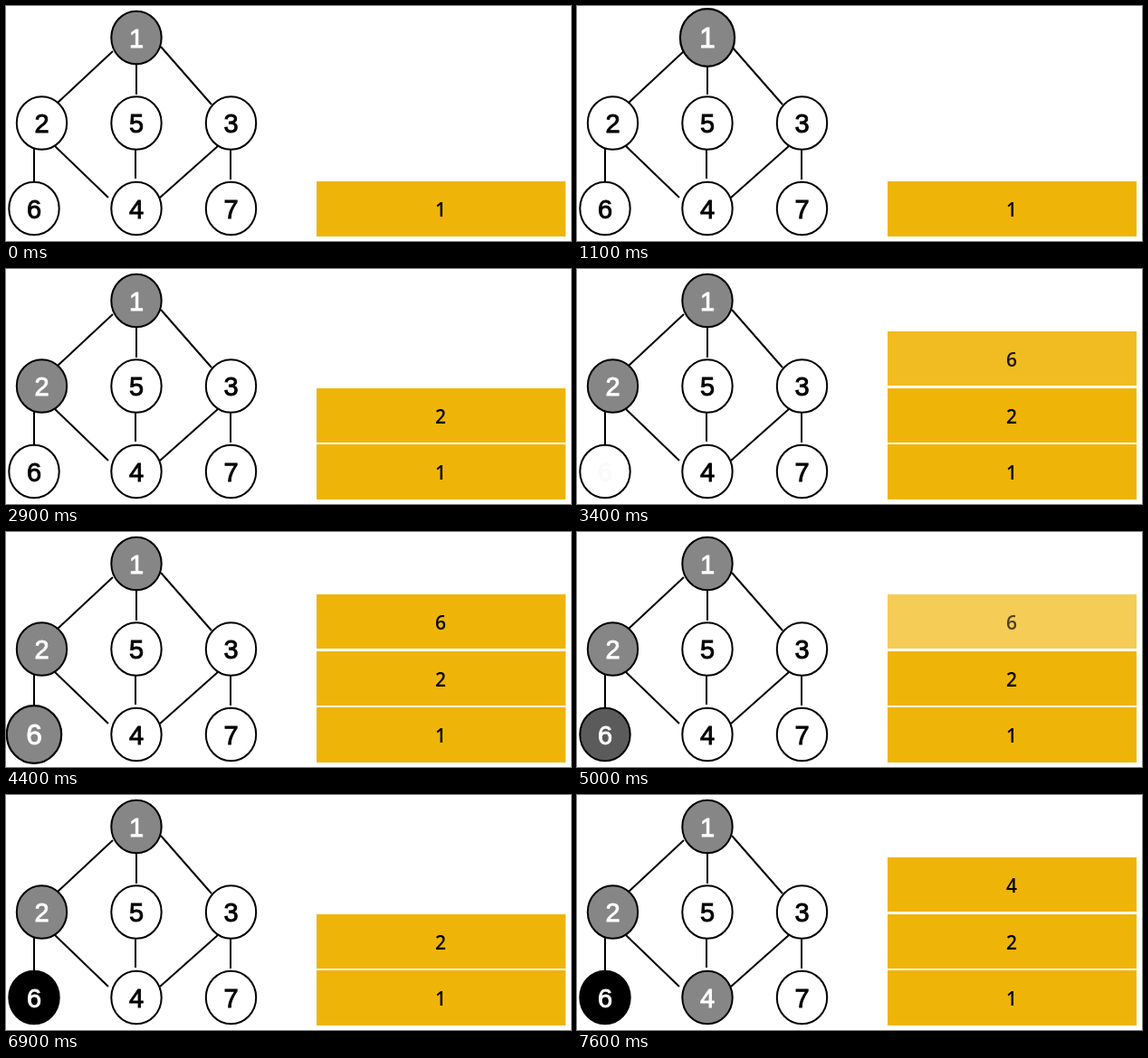
Write an HTML page with a canvas that moves like this. It is 624 px wide and 260 px high and loops after 8 s.

```html
<!DOCTYPE html>
<html lang="en">
<head>
<meta charset="utf-8">
<title>Depth-first search with a stack</title>
<style>
  html, body { margin: 0; width: 100%; height: 100%; overflow: hidden; background: #fff; }
  canvas { display: block; }
</style>
</head>
<body>
<canvas id="stage" width="624" height="260"></canvas>
<script>
const ctx = document.getElementById('stage').getContext('2d');
const LOOP = 8000, STEP = 100;
const WHITE = 255, GRAY = 134, BLACK = 0;

const nodes = {
  1: [144, 35], 2: [39.5, 129.5], 5: [144, 129.5], 3: [248.5, 129.5],
  6: [31, 224], 4: [144, 224], 7: [248.5, 224]
};
const edges = [
  [118, 50, 57, 107], [144, 65, 144, 98], [171, 45, 227, 109],
  [31, 158, 31, 194], [54, 155, 113, 212], [143, 159, 143, 191],
  [234, 155, 170, 212], [248, 159, 248, 192]
];
const pulses = [
  { node: 1, start: 700, length: 500, amount: .25 },
  { node: 2, start: 2500, length: 400, amount: .18 },
  { node: 6, start: 4100, length: 500, amount: .1 },
  { node: 2, start: 6400, length: 500, amount: .25 }
];
// Each visit pushes a label onto the stack, then shades its node.
const visits = [
  { node: 1, start: -1000, length: 500, level: 0 },
  { node: 2, start: 1600, length: 500, level: 1 },
  { node: 6, start: 3000, length: 700, level: 2, pop: 4860 },
  { node: 4, start: 7000, length: 600, level: 2 }
];
const POP_LENGTH = 440;

const clamp = v => Math.max(0, Math.min(1, v));
const mix = (a, b, p) => a + (b - a) * p;
const gray = v => `rgb(${v}, ${v}, ${v})`;
const progress = (t, start, length) => clamp((t - start) / length);

function scaleOf(id, t) {
  return pulses.filter(p => p.node === id).reduce((scale, p) =>
    scale + p.amount * Math.sin(Math.PI * progress(t, p.start, p.length)) ** 2, 1);
}

function shadeOf(id, t) {
  const visit = visits.find(v => v.node === id);
  if (!visit) return { fill: WHITE, text: BLACK };
  const p = progress(t, visit.start, visit.length);
  const shaded = mix(WHITE, GRAY, clamp((p - .5715) / .4285));
  const done = visit.pop ? progress(t, visit.pop, POP_LENGTH) : 0;
  return { fill: mix(shaded, BLACK, done), text: mix(BLACK, WHITE, clamp(p / .585)) };
}

function drawNode(id, t) {
  const [x, y] = nodes[id], scale = scaleOf(id, t), { fill, text } = shadeOf(id, t);
  ctx.save();
  ctx.translate(x, y);
  ctx.scale(scale, scale);
  ctx.beginPath();
  ctx.ellipse(0, 0, 27.7, 29.3, 0, 0, 2 * Math.PI);
  ctx.fillStyle = gray(fill);
  ctx.fill();
  ctx.strokeStyle = '#000';
  ctx.lineWidth = 2;
  ctx.stroke();
  ctx.font = '29px "Liberation Sans", Arial, sans-serif';
  ctx.fillStyle = ctx.strokeStyle = gray(text);
  ctx.lineWidth = .9;
  ctx.fillText(id, 0, 10.5);
  ctx.strokeText(id, 0, 10.5);
  ctx.restore();
}

function drawCell({ node, start, length, level, pop }, t) {
  const shown = clamp(progress(t, start, length) / .64);
  const gone = pop ? progress(t, pop, POP_LENGTH) : 0;
  const top = 194 - level * 62.5;
  ctx.globalAlpha = shown * (1 - gone);
  ctx.fillStyle = '#efb408';
  ctx.fillRect(343, Math.round(top), 275, level ? 60 : 61);
  ctx.fillStyle = '#000';
  ctx.font = '600 21px "Open Sans", sans-serif';
  ctx.fillText(node, 480, top + 39);
  ctx.globalAlpha = 1;
}

function draw(t) {
  ctx.fillStyle = '#fff';
  ctx.fillRect(0, 0, 624, 260);
  ctx.textAlign = 'center';
  ctx.strokeStyle = '#000';
  ctx.lineWidth = 2;
  ctx.beginPath();
  for (const [x1, y1, x2, y2] of edges) {
    ctx.moveTo(x1, y1);
    ctx.lineTo(x2, y2);
  }
  ctx.stroke();
  for (const id of Object.keys(nodes)) drawNode(Number(id), t);
  for (const visit of visits) drawCell(visit, t);
}

const origin = performance.now();
function tick() {
  const t = (performance.now() - origin) % LOOP;
  draw(Math.floor(t / STEP) * STEP);
  requestAnimationFrame(tick);
}
tick();
</script>
</body>
</html>
```
